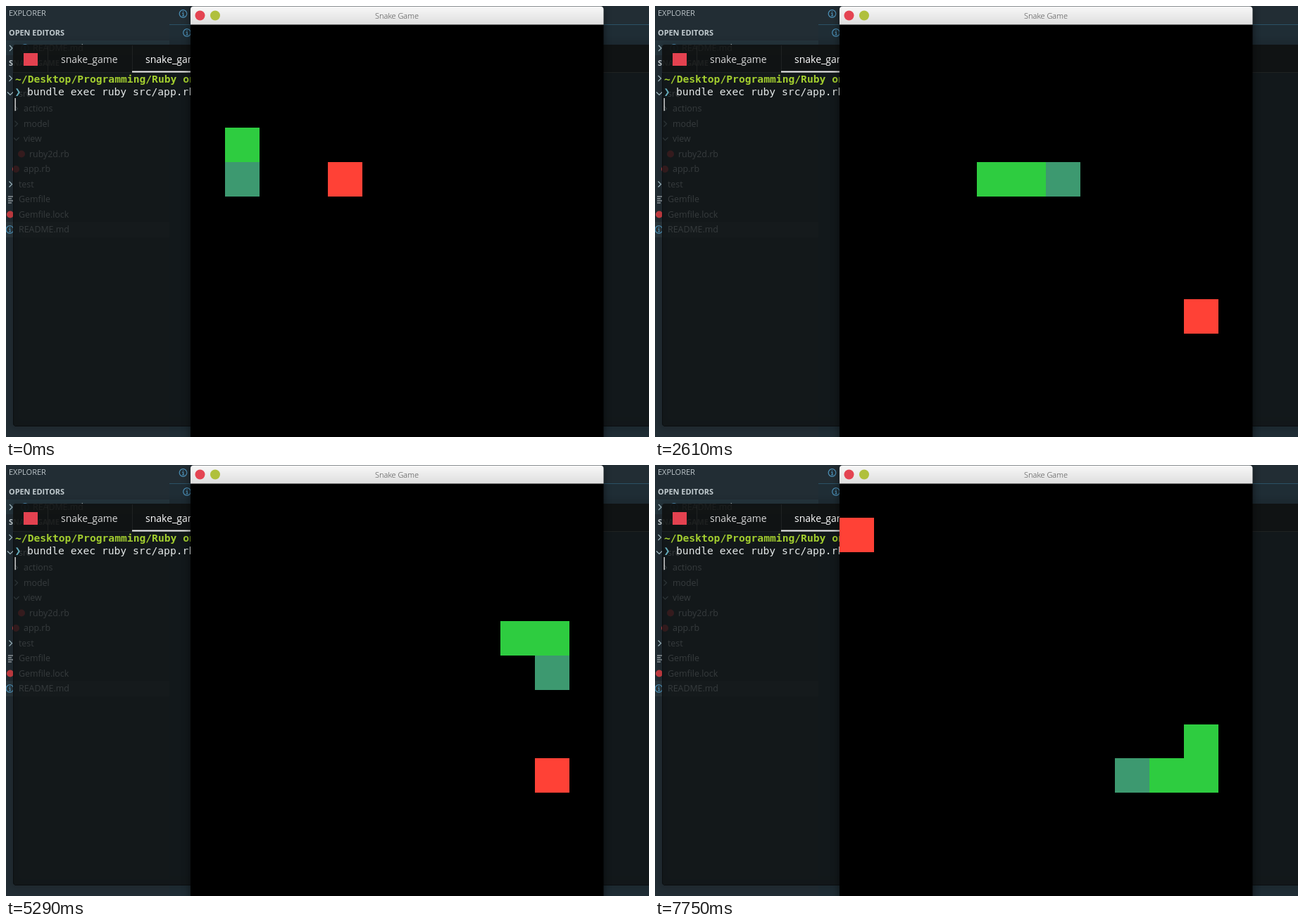
Write an HTML page that moves like this. It is 913 px wide and 613 px high and loops after 8 s.

```html
<!DOCTYPE html>
<html lang="en">
<head>
<meta charset="utf-8">
<title>Snake Game</title>
<style>
  html, body { margin: 0; width: 100%; height: 100%; overflow: hidden; background: #222d34; }
  svg { display: block; width: 913px; height: 613px; }
  text { white-space: pre; }
  .ui { font-family: "Open Sans", "Noto Sans", sans-serif; }
  .mono { font: 14.667px "DejaVu Sans Mono", monospace; }
</style>
</head>
<body>
<svg viewBox="0 0 913 613" xmlns="http://www.w3.org/2000/svg">
  <defs>
    <linearGradient id="bar" x2="0" y2="1">
      <stop offset="0" stop-color="#f8f8f8"/>
      <stop offset="1" stop-color="#dedede"/>
    </linearGradient>
    <filter id="blur" x="-10%" y="-10%" width="120%" height="120%">
      <feGaussianBlur stdDeviation="6"/>
    </filter>
    <g id="info" fill="none" stroke="#4d91b8" stroke-width="1.2">
      <circle r="5.3"/>
      <path d="M-1.3-.7H.2V3M-1.5 3H1.7M0-3.2V-2"/>
    </g>
  </defs>

  <!-- editor -->
  <rect width="913" height="613" fill="#222d34"/>
  <rect x="232" y="27" width="681" height="586" fill="#1f2d35"/>
  <rect x="232" y="26" width="681" height="1" fill="#2b5266"/>
  <rect y="49" width="232" height="21" fill="#26363e"/>
  <rect y="307" width="232" height="22" fill="#2b373d"/>
  <g class="ui" fill="#cfd8dc">
    <text x="4" y="14" font-size="11" fill="#bcc5c9">EXPLORER</text>
    <text x="4" y="42" font-size="10.9" font-weight="700" fill="#c3ccd0">OPEN EDITORS</text>
    <text x="4" y="85" font-size="10.9" font-weight="700">SNAKE_GAME</text>
    <text x="38" y="64" font-size="12.4">README.md</text>
    <g id="files" font-size="12.4"></g>
  </g>
  <use href="#info" x="251.5" y="11"/>
  <use href="#info" x="257" y="38"/>
  <use href="#info" x="27" y="60"/>
  <use href="#info" x="5.5" y="318"/>
  <path d="M3 271H10M3 274H8M3 277H10M3 280H8" stroke="#cfd8dc" stroke-width="1.2"/>
  <g id="chevrons" fill="none" stroke="#a9c3cd" stroke-width="1.2"></g>
  <g id="gems" fill="#cc3e44"></g>

  <!-- terminal -->
  <path d="M10 55H930V597H10Z" fill="none" stroke="#000" stroke-opacity=".3" stroke-width="5" filter="url(#blur)"/>
  <path d="M10 94H913V597H14Q10 597 10 593Z" fill="#101314" fill-opacity=".8"/>
  <path d="M10 94V59Q10 55 14 55H913V94Z" fill="#101212" fill-opacity=".93"/>
  <path d="M10.5 94V593Q10.5 597.5 14 597.5H913" fill="none" stroke="#0b0e10"/>
  <path d="M59.5 56V94M179.5 56V94M10 94.5H913" stroke="#1f2222"/>
  <rect x="25" y="67" width="20" height="18" fill="#e44250"/>
  <rect x="179" y="92.5" width="90" height="2" fill="#f2f2f2"/>
  <g class="ui" font-size="14">
    <text x="78" y="81" fill="#d8d8d8">snake_game</text>
    <text x="198" y="81" fill="#fff">snake_game</text>
  </g>
  <g class="mono">
    <text x="13" y="109" font-weight="700" fill="#a3ce2f">~/Desktop/Programming/Ruby on</text>
    <text x="12.5" y="127" fill="#66aebd">❯</text>
    <text x="30" y="127" fill="#e4e8e8">bundle exec ruby src/app.rb</text>
  </g>
  <rect x="12.5" y="131" width="1.3" height="18" fill="#e8e8e8"/>

  <!-- game window -->
  <rect x="262" y="3" width="586.5" height="620" fill="#000" opacity=".5" filter="url(#blur)"/>
  <rect x="262" y="26" width="586.5" height="587" fill="#000"/>
  <path d="M262 26.5V5Q262 .5 266.500 .5H844Q848.5 .5 848.5 5V26.5Z" fill="url(#bar)"/>
  <circle cx="275.5" cy="13.5" r="7" fill="#e44452"/>
  <circle cx="297" cy="13.5" r="7" fill="#b0c03c"/>
  <text class="ui" x="555" y="17.500" font-size="11" font-weight="300" text-anchor="middle" fill="#444">Snake Game</text>
  <g id="board" shape-rendering="crispEdges"></g>
</svg>
<script>
const NS = "http://www.w3.org/2000/svg";
const byId = id => document.getElementById(id);

function add(parent, tag, attrs, text = "") {
  const node = document.createElementNS(NS, tag);
  for (const key in attrs) node.setAttribute(key, attrs[key]);
  node.textContent = text;
  return parent.appendChild(node);
}

// File tree: one row every 21.5 px
const files = [
  ["src", 18], ["actions", 25], ["model", 25], ["view", 25], ["ruby2d.rb", 33],
  ["app.rb", 25], ["test", 18], ["Gemfile", 18], ["Gemfile.lock", 18], ["README.md", 18]
];
files.forEach(([name, x], i) =>
  add(byId("files"), "text", { x, y: 128.8 + 21.5 * i }, name));

const closed = [[7, 60], [6.5, 103], [14.5, 146], [14.5, 167.500], [6.5, 253.5]];
const open = [[6, 124.5], [14.5, 189]];
for (const [x, y] of closed) add(byId("chevrons"), "path", { d: `M${x - 2} ${y - 4}l4 4l-4 4` });
for (const [x, y] of open) add(byId("chevrons"), "path", { d: `M${x - 4} ${y - 2}l4 4l4 -4` });
for (const [cx, cy] of [[22, 210.5], [14, 232], [6, 296.5]]) add(byId("gems"), "circle", { cx, cy, r: 5 });

// Game
const LOOP = 8000, CELL = 48.87, LEFT = 262, TOP = 26.5;
const BODY = "#2ecc40", HEAD = "#3d9970", FOOD = "#ff4136";
const ticks = [0, 570, 1070, 1620, 2110, 2610, 3110, 3720, 4320, 4780, 5290, 5790, 6290, 6780, 7260, 7750];
const meals = [{ tick: 3, cell: [4, 4] }, { tick: 13, cell: [10, 8] }, { tick: Infinity, cell: [0, 1] }];

const path = [[1, 3], [1, 4]];
function walk(dx, dy, count) {
  while (count--) {
    const [x, y] = path[path.length - 1];
    path.push([x + dx, y + dy]);
  }
}
walk(1, 0, 9);
walk(0, 1, 4);
walk(-1, 0, 2);

const board = byId("board");
const edge = (origin, n) => Math.round(origin + CELL * n);

function drawCell([col, row], fill) {
  const x = edge(LEFT, col), y = edge(TOP, row);
  add(board, "rect", { x, y, width: edge(LEFT, col + 1) - x, height: edge(TOP, row + 1) - y, fill });
}

let shown = -1;
function render(time) {
  const tick = ticks.findLastIndex(t => t <= time);
  if (tick === shown) return;
  shown = tick;
  board.replaceChildren();
  const eaten = meals.filter(meal => meal.tick <= tick).length;
  const head = tick + 1, length = 2 + eaten;
  drawCell(meals[eaten].cell, FOOD);
  path.slice(head - length + 1, head).forEach(cell => drawCell(cell, BODY));
  drawCell(path[head], HEAD);
}

const start = performance.now();
function loop() {
  render((performance.now() - start) % LOOP);
  requestAnimationFrame(loop);
}
loop();
</script>
</body>
</html>
```
